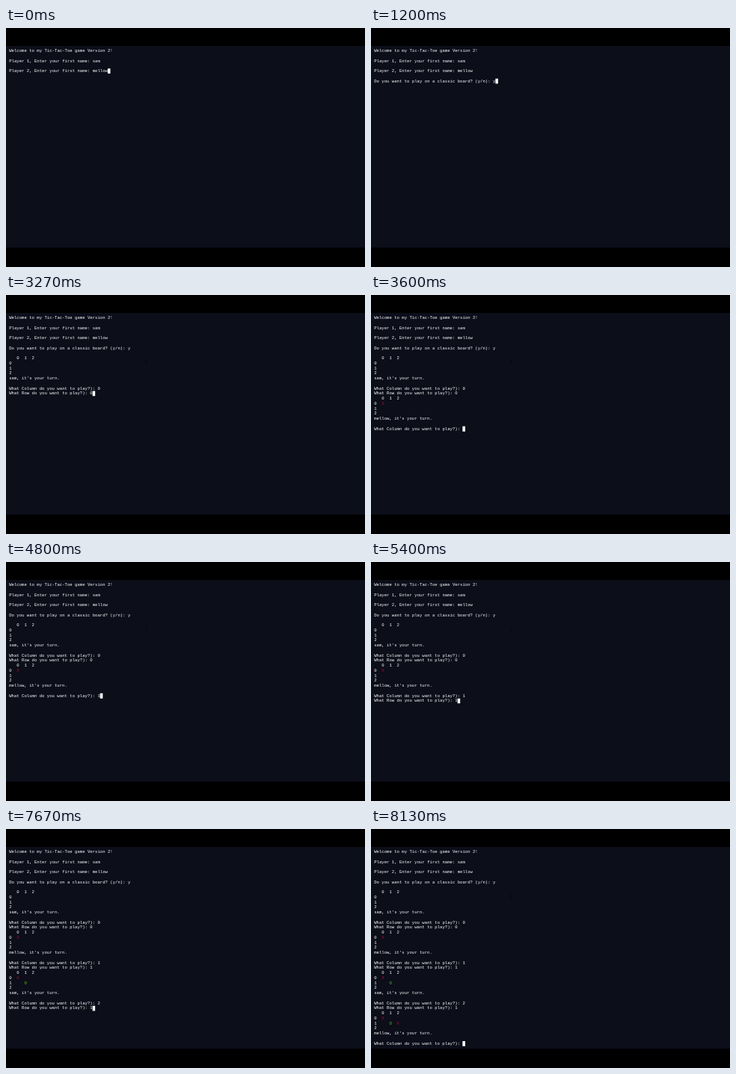
These frames come from a looping animation (480x320 px, 9.39 s). An HTML page:

```html
<!DOCTYPE html>
<html lang="en">
<head>
<meta charset="utf-8">
<style>
  html, body { margin: 0; width: 100%; height: 100%; overflow: hidden; background: #000; }
  #screen { position: absolute; top: 24px; left: 0; width: 480px; height: 270px; background: #0c0e1a; overflow: hidden; }
  /* Large type scaled down keeps the fractional character pitch;
     the tiny rotation stops baselines snapping to whole pixels. */
  pre {
    position: absolute; left: 0; top: 0; margin: 0;
    font: 56.3px/67.55px "Liberation Mono", monospace; color: #fff;
    transform: translate(4.2px, 3.25px) rotate(.01deg) scale(.1); transform-origin: 0 0;
  }
  pre i { display: inline-block; width: 1.05ch; height: 67.55px; vertical-align: top; background: #fff; }
  .x { color: #a8102c; }
  .o { color: #68c810; }
  #mouse { position: absolute; left: 187px; top: 63px; width: 1px; height: 6px; background: #06070e; }
</style>
</head>
<body>
<div id="screen"><pre id="term"></pre><div id="mouse"></div></div>
<script>
const LOOP = 9390;
const [one, two] = ['sam', 'mellow'];
const X = '<span class="x">X</span>';
const O = '<span class="o">O</span>';
const row = '\nWhat Row do you want to play?): ';
const turn = (name, r0 = '', r1 = '') =>
  `\n   0  1  2\n0  ${r0}\n1  ${r1}\n2\n${name}, it's your turn.\n\nWhat Column do you want to play?): `;

// [time, text added to the terminal]
const steps = [
  [0, `Welcome to my Tic-Tac-Toe game Version 2!\n\nPlayer 1, Enter your first name: ${one}\n\nPlayer 2, Enter your first name: ${two}`],
  [130, '\n\nDo you want to play on a classic board? (y/n): '],
  [1200, 'y'],
  [1330, '\n' + turn(one)],
  [2670, '0'],
  [3070, row],
  [3270, '0'],
  [3600, turn(two, X)],
  [4800, '1'],
  [5070, row],
  [5400, '1'],
  [5730, turn(one, X, '   ' + O)],
  [6870, '2'],
  [7130, row],
  [7670, '1'],
  [8130, turn(two, X, `   ${O}  ${X}`)],
];

const term = document.getElementById('term');
const mouse = document.getElementById('mouse');
let shown = -1;

function draw() {
  const t = performance.now() % LOOP;
  const done = steps.filter(([at]) => at <= t);
  if (done.length !== shown) {
    shown = done.length;
    term.innerHTML = done.map(s => s[1]).join('') + '<i></i>';
  }
  mouse.hidden = t < 2800;
  requestAnimationFrame(draw);
}
draw();
</script>
</body>
</html>
```
